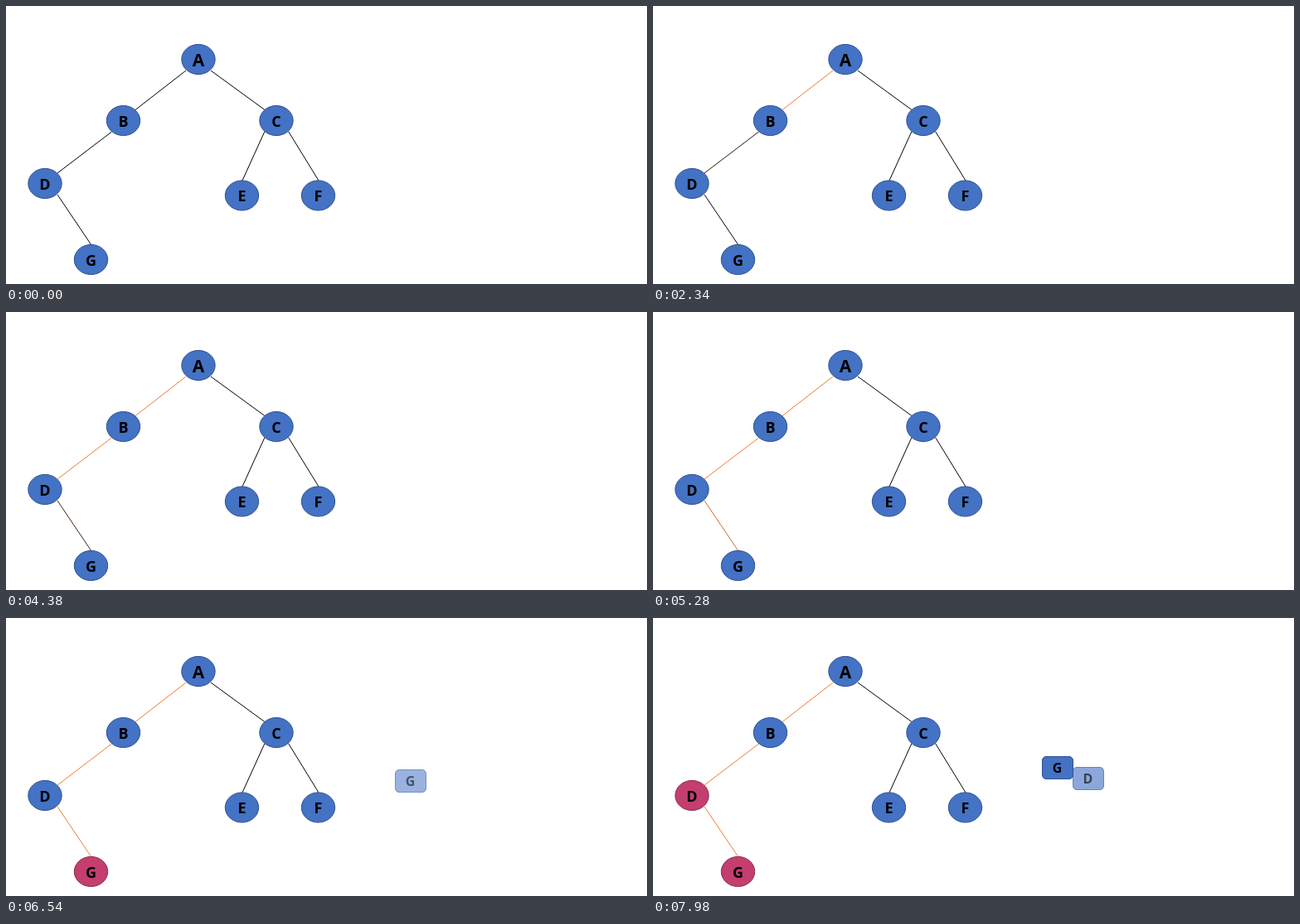
An HTML page with a canvas for the animation above (8000 ms loop, 773 by 336 pixels).

```html
<!DOCTYPE html>
<html lang="en">
<head>
<meta charset="utf-8">
<title>Tree traversal</title>
<style>
html, body { margin: 0; width: 100%; height: 100%; overflow: hidden; background: #fff; }
canvas { display: block; }
</style>
</head>
<body>
<canvas id="stage" width="773" height="336"></canvas>
<script>
const ctx = document.getElementById('stage').getContext('2d');
const LOOP = 8000, STEP = 60;
const BLUE = [68, 114, 196], BLUE_EDGE = [47, 82, 143];
const PINK = [196, 62, 110], PINK_EDGE = [136, 48, 88];
const BLACK = [0, 0, 0], ORANGE = [237, 125, 49];
const FADE = 1560, FLOAT = 1000, TINT = 500, RISE = 34;

// Start times are in ms; parts without one never change.
const edges = [
  { from: [217, 78], to: [156, 125.5], start: 100 },
  { from: [247, 78], to: [312, 125.5] },
  { from: [127.5, 152], to: [62, 202], start: 2030 },
  { from: [312, 151.5], to: [285, 211] },
  { from: [340.5, 151.5], to: [377, 211] },
  { from: [62, 228], to: [103, 289], start: 3955 }
];
const nodes = [
  { label: 'A', x: 232, y: 64.5, size: 21, dy: 1.3 },
  { label: 'B', x: 141.5, y: 138.5 },
  { label: 'C', x: 326, y: 138.5 },
  { label: 'D', x: 47, y: 214.5, start: 7370 },
  { label: 'E', x: 284.5, y: 229 },
  { label: 'F', x: 376.5, y: 229 },
  { label: 'G', x: 102.5, y: 306.5, start: 6000 }
];
const boxes = [
  { label: 'G', x: 469.5, start: 6000 },
  { label: 'D', x: 506.5, start: 7370 }
];

function progress(t, start, length) {
  return start === undefined ? 0 : Math.min(1, Math.max(0, (t - start) / length));
}

function mix(a, b, p) {
  return `rgb(${a.map((v, i) => Math.round(v + (b[i] - v) * p)).join(',')})`;
}

function drawLabel(text, x, y, size) {
  ctx.font = `bold ${size}px "Noto Sans", "Open Sans", sans-serif`;
  ctx.textAlign = 'center';
  ctx.textBaseline = 'alphabetic';
  ctx.fillStyle = '#000';
  ctx.fillText(text, x, y + size * 0.357);
}

function paintShape(p) {
  ctx.fillStyle = mix(BLUE, PINK, p);
  ctx.strokeStyle = mix(BLUE_EDGE, PINK_EDGE, p);
  ctx.fill();
  ctx.stroke();
}

function drawEdge({ from, to, start }, t) {
  ctx.strokeStyle = mix(BLACK, ORANGE, progress(t, start, FADE));
  ctx.beginPath();
  ctx.moveTo(...from);
  ctx.lineTo(...to);
  ctx.stroke();
}

function drawNode({ label, x, y, size = 18, dy = 0.7, start }, t) {
  ctx.beginPath();
  ctx.ellipse(x, y, 20.2, 18.1, 0, 0, Math.PI * 2);
  paintShape(progress(t, start, TINT));
  drawLabel(label, x, y + dy, size);
}

function drawBox({ label, x, start }, t) {
  const p = progress(t, start, FLOAT);
  if (!p) return;
  const y = 167.5 + Math.round(RISE * (1 - p));
  ctx.globalAlpha = p;
  ctx.beginPath();
  ctx.roundRect(x, y, 37, 27, 4.5);
  paintShape(0);
  drawLabel(label, x + 18, y + 14, 16);
  ctx.globalAlpha = 1;
}

function frame(now) {
  const t = Math.floor((now % LOOP) / STEP) * STEP;
  ctx.fillStyle = '#fff';
  ctx.fillRect(0, 0, 773, 336);
  ctx.lineWidth = 1;
  edges.forEach(e => drawEdge(e, t));
  nodes.forEach(n => drawNode(n, t));
  boxes.forEach(b => drawBox(b, t));
}

const origin = performance.now();
function tick() {
  frame(performance.now() - origin);
  requestAnimationFrame(tick);
}
tick();
</script>
</body>
</html>
```
